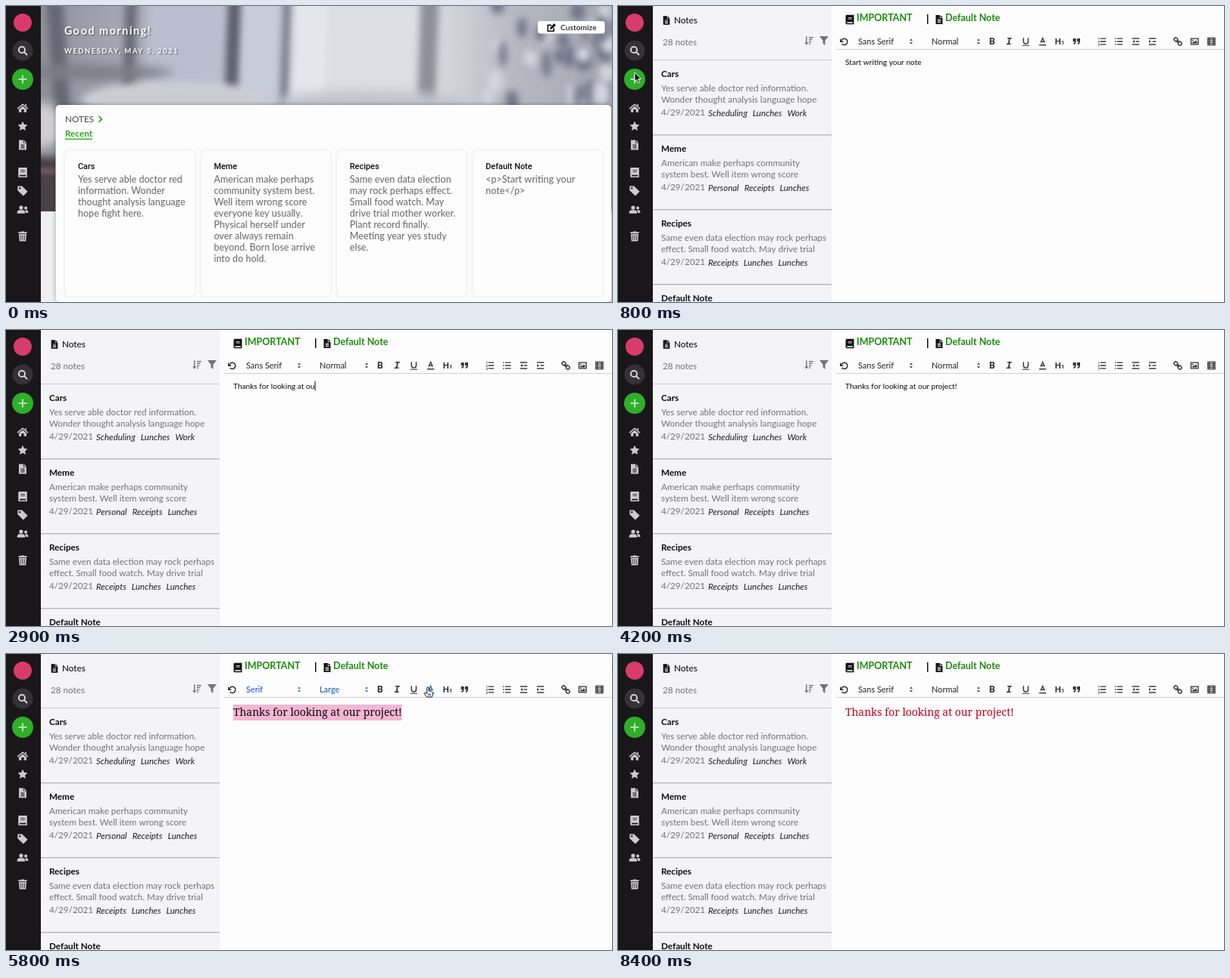
An HTML page with a canvas for the animation above (8500 ms loop, 800 by 392 pixels).

```html
<!DOCTYPE html>
<html lang="en">
<head>
<meta charset="utf-8">
<title>Notes app</title>
<style>
html, body { margin: 0; width: 100%; height: 100%; overflow: hidden; background: #fff; }
canvas { display: block; width: 800px; height: 392px; }
</style>
</head>
<body>
<canvas id="stage" width="800" height="392"></canvas>
<script>
const LOOP = 8500, STEP = 100, W = 800, H = 392;
const ctx = document.getElementById('stage').getContext('2d');
const LATO = 'Lato, sans-serif', ROBOTO = 'Roboto, sans-serif', SERIF = '"Noto Serif", serif';
const MONO = '"Liberation Mono", monospace';
const GREEN = '#2ba31c', BLUE = '#1a5fc4', INK = '#333', RED = '#c4001e', PINK = '#f4b6d4';
const MESSAGE = 'Thanks for looking at our project!';
const within = (t, a, b) => t >= a && t < b;

function rect(x, y, w, h, color) {
  ctx.fillStyle = color;
  ctx.fillRect(x, y, w, h);
}

function box(x, y, w, h, r, color, blur = 0, shade = 'transparent') {
  ctx.shadowBlur = blur;
  ctx.shadowColor = shade;
  ctx.fillStyle = color;
  ctx.beginPath();
  ctx.roundRect(x, y, w, h, r);
  ctx.fill();
  ctx.shadowColor = 'transparent';
}

function disc(x, y, r, color) {
  ctx.beginPath();
  ctx.arc(x, y, r, 0, 7);
  ctx.fillStyle = color;
  ctx.fill();
}

function text(str, x, y, font, color, spacing = 0) {
  ctx.font = font;
  ctx.letterSpacing = spacing + 'px';
  ctx.fillStyle = color;
  ctx.fillText(str, x, y);
  return ctx.measureText(str).width;
}

function stroke(d, color, width) {
  ctx.strokeStyle = color;
  ctx.lineWidth = width;
  ctx.stroke(new Path2D(d));
}

function fill(d, color) {
  ctx.fillStyle = color;
  ctx.fill(new Path2D(d), 'evenodd');
}

function at(x, y, scale, paint) {
  ctx.save();
  ctx.translate(x, y);
  ctx.scale(scale, scale);
  paint();
  ctx.restore();
}

// Path pieces; overlaps are cut out by the even-odd rule
const bar = (x, y, w, h) => `M${x} ${y}h${w}v${h}h${-w}z`;
const bars = (n, x, y, w, h, gap) => Array.from({ length: n }, (_, i) => bar(x, y + i * gap, w, h)).join('');
const cols = (n, x, y, w, h, gap) => Array.from({ length: n }, (_, i) => bar(x + i * gap, y, w, h)).join('');
const ring = (x, y, r) => `M${x - r} ${y}a${r} ${r} 0 1 0 ${2 * r} 0a${r} ${r} 0 1 0 ${-2 * r} 0z`;
const star = 'M' + Array.from({ length: 10 }, (_, i) => {
  const r = i % 2 ? 4 : 8.2, a = i * Math.PI / 5;
  return `${r * Math.sin(a)} ${-r * Math.cos(a)}`;
}).join('L') + 'z';

// Solid icons, 16 units wide around the origin
const icons = {
  home: 'M0-7L9 .5 7.8 2 0-4.5-7.8 2-9 .5zM0-3L6 2V7H2V2.5H-2V7H-6V2z' + bar(4, -6, 2, 4),
  star,
  file: 'M-6-8H1V-3H6V8H-6zM2-8L6-4H2z' + bars(3, -3, -.7, 6, 1.2, 2.5),
  book: 'M-4.5-8H7V8H-4.5A2.2 2.2 0 0 1-7 5.8V-5.8A2.2 2.2 0 0 1-4.5-8z' + bar(-4.7, 4, 9.7, 2) + bars(2, -3, -4, 6.5, 1, 2.4),
  tag: 'M-8-8H-1L8 1 1 8-8-1z' + ring(-4.5, -4.5, 1.5),
  users: ring(-2.5, -3, 3.2) + ring(5, -2.5, 2.5) + 'M-9 6.5Q-9 1-5 1H0Q4 1 4 6.5zM3.5 1H6Q9 1 9 5.5H5Q5 3 3.5 1z',
  trash: bar(-7, -7, 14, 2) + bar(-2.5, -8, 5, 1) + 'M-6-4H6L5.2 8H-5.2z' + cols(3, -3.2, -2, .9, 8, 2.8),
  edit: 'M-7-5H0V-3H-5V5H3V1.5L5 0V7H-7zM-2 0L4.5-7 7.5-4 .5 2.6-2.6 3.2z',
  filter: 'M-8-8H8L2-.5V8L-2 4.5V-.5z',
  sort: 'M-5.5-8h2V3h2.5L-4.5 8-8 3h2.5z' + [8, 6, 4.3, 2.5].map((w, i) => bar(0, -7 + i * 4, w, 2)).join('')
};
const icon = (name, x, y, size, color) => at(x, y, size / 16, () => fill(icons[name], color));

// Blurred interior: window frames, a pale wall, mottled curtain and an open book
const photo = document.createElement('canvas');
photo.width = W;
photo.height = 272;
function paintPhoto() {
  const p = photo.getContext('2d');
  let seed = 7;
  const rnd = () => (seed = seed * 16807 % 2147483647) / 2147483647;
  const soft = (blur, color) => { p.filter = `blur(${blur}px)`; p.fillStyle = color; };
  const post = (x, w, color, lean = 6) => {
    soft(5, color);
    p.beginPath();
    [[x, -20], [x + w, -20], [x + w - lean, 150], [x - lean, 150]].forEach(q => p.lineTo(...q));
    p.fill();
  };
  const blob = (x, y, rx, ry, color, blur = 7) => {
    soft(blur, color);
    p.beginPath();
    p.ellipse(x, y, rx, ry, 0, 0, 7);
    p.fill();
  };
  const g = p.createLinearGradient(46, 0, W, 0);
  ['#8f919b', '#a9acb8', '#c3c7d3', '#dcdde5', '#dedee5', '#b6b8c2', '#a3a5b0']
    .forEach((c, i) => g.addColorStop(i / 6, c));
  p.fillStyle = g;
  p.fillRect(0, 0, W, 272);
  post(52, 22, '#666973', -12);
  post(158, 16, '#6a6d79');
  post(188, 98, '#b9bfce');
  post(293, 18, '#5d606d');
  post(318, 44, '#c6ccda');
  post(366, 11, '#777b89');
  post(384, 42, '#e5e6ed');
  post(548, 24, '#8d8f9a');
  for (let i = 0; i < 34; i++)
    blob(636 + rnd() * 170, rnd() * 130, 5 + rnd() * 7, 8 + rnd() * 10, i % 3 ? '#74778a' : '#d3d5de', 5);
  blob(110, 88, 110, 10, '#7d7e87');
  blob(225, 124, 125, 24, '#cccdd4', 5);
  blob(480, 130, 130, 18, '#c2c3cb');
  blob(40, 158, 40, 30, '#cfced2');
  soft(5, '#4a4145');
  p.fillRect(0, 200, 90, 90);
  soft(3, '#87636a');
  p.fillRect(0, 216, 90, 5);
}
paintPhoto();

function sidebar() {
  rect(0, 0, 46, H, '#1a171a');
  disc(22, 22, 12, '#d93b6c');
  disc(22, 59, 13.5, '#343236');
  stroke(ring(21, 58, 4.1) + 'M24 61l4 4', '#d6d5d8', 2);
  disc(22, 97, 14, '#2fae2a');
  stroke('M22 91.5v11M16.5 97h11', '#b5dfb2', 2.2);
  ['home', 'star', 'file', '', 'book', 'tag', 'users', '', 'trash'].forEach((name, i) => {
    if (name) icon(name, 22, 135 + 24.5 * i - 12.5 * (i > 3) - 13.5 * (i > 7), 13.2, '#cbcacd');
  });
}

const cards = {
  'Cars': 'Yes serve able doctor red|information. Wonder|thought analysis language|hope fight here.',
  'Meme': 'American make perhaps|community system best.|Well item wrong score|everyone key usually.|Physical herself under|over always remain|beyond. Born lose arrive|into do hold.',
  'Recipes': 'Same even data election|may rock perhaps effect.|Small food watch. May|drive trial mother worker.|Plant record finally.|Meeting year yes study|else.',
  'Default Note': '<p>Start writing your|note</p>'
};

function homePage() {
  rect(46, 0, 754, H, '#f0eff0');
  ctx.drawImage(photo, 0, 0);
  ctx.shadowColor = 'rgba(0,0,0,.5)';
  ctx.shadowBlur = 1.5;
  ctx.shadowOffsetX = ctx.shadowOffsetY = 1.2;
  text('Good morning!', 77, 38, '700 14.3px ' + LATO, '#fff', 1.56);
  text('WEDNESDAY, MAY 5, 2021', 77, 63, '700 9.36px ' + LATO, '#fff', 1.56);
  ctx.shadowColor = 'transparent';
  ctx.shadowOffsetX = ctx.shadowOffsetY = 0;

  box(702, 20, 88.5, 16.5, 3, '#fff');
  icon('edit', 720, 28.5, 12.5, '#111');
  text('Customize', 732, 32, '500 10.3px ' + LATO, '#111');

  box(65.5, 131, 733.5, 261, 5, '#fefdfe', 5, 'rgba(0,0,0,.4)');
  text('NOTES', 78, 154, '500 11.7px ' + LATO, '#555');
  stroke('M122.5 146l3.9 3.8l-3.9 3.8', GREEN, 1.7);
  const w = text('Recent', 78, 173, '700 11.7px ' + LATO, GREEN);
  rect(78, 175.6, w, 1.3, GREEN);

  Object.entries(cards).forEach(([title, body], i) => {
    const x = 78 + i * 179.4;
    box(x, 191.5, 171, 193, 6, '#fefdfe', 4, 'rgba(70,60,100,.16)');
    text(title, x + 17, 216, '500 10.92px ' + ROBOTO, '#111');
    body.split('|').forEach((row, k) => text(row, x + 17, 234 + k * 15, '500 12.5px ' + LATO, '#707072'));
  });
}

const notes = [
  ['Cars', 'Yes serve able doctor red information.|Wonder thought analysis language hope', 'Scheduling Lunches Work'],
  ['Meme', 'American make perhaps community|system best. Well item wrong score', 'Personal Receipts Lunches'],
  ['Recipes', 'Same even data election may rock perhaps|effect. Small food watch. May drive trial', 'Receipts Lunches Lunches'],
  ['Default Note', '', '']
];

function noteList() {
  const plain = '11.7px ' + LATO, grey = '#737376';
  rect(46, 0, 236, H, '#f4f3f5');
  icon('file', 64, 19, 11.5, '#111');
  text('Notes', 74, 23, '500 ' + plain, '#111');
  text('28 notes', 59, 52, plain, grey);
  icon('sort', 252, 46, 11.5, grey);
  icon('filter', 272, 46, 12, grey);
  rect(46, 71, 236, 1, '#c9c8ca');
  notes.forEach(([title, body, tags], i) => {
    const y = i * 99.1;
    text(title, 57, y + 94, '700 ' + plain, '#0c0c0c');
    if (!tags) return;
    body.split('|').forEach((row, k) => text(row, 57, y + 113 + k * 14.5, plain, grey));
    text('4/29/2021', 57, y + 145, plain, grey);
    let x = 119;
    for (const tag of tags.split(' ')) x += text(tag, x, y + 145.5, 'italic 11.5px ' + LATO, '#222') + 7;
    rect(46, Math.round(y + 170), 236, 1.4, '#b7b6b9');
  });
}

// Toolbar buttons, painted around the origin
const letter = (str, font, x, color = INK) => text(str, x, 4.3, font, color);
const rows = (x, w) => [-4, 0, 4].forEach((y, i) => rect(i === 1 ? x : Math.min(x, 4.7 - w), y - .7, i === 1 ? 4.7 - x : w, 1.4, INK));
const listLines = () => fill(bars(3, -2.3, -4.6, 7.5, 1.4, 3.9), INK);
const indent = d => {
  rows(0, 9.4);
  fill(`M${-3 - d * 1.6}-2V2L${-3 + d * 1.2} 0z`, INK);
};
const buttons = [
  [494, [
    () => letter('B', '700 12.3px ' + ROBOTO, -4),
    () => letter('I', 'italic 700 13px ' + MONO, -3.9),
    () => { stroke('M-3.1-4.7V0a3.1 3.1 0 0 0 6.2 0V-4.7', INK, 1.4); rect(-4.7, 4.7, 9.4, 1, INK); },
    s => {
      const tone = s.colorOn ? BLUE : INK;
      stroke('M-2.7 1.6L0-4.7L2.7 1.6M-2 0H2', tone, 1.3);
      rect(-4.7, 4, 9.4, 1.4, s.colorOn && s.red ? RED : tone);
    },
    () => { letter('H', '700 11.5px ' + ROBOTO, -6); letter('1', '700 7.5px ' + ROBOTO, 2.3); },
    () => [-4, 1.4].forEach(x => at(x, 0, 1, () => fill('M-.4-4h4v4q0 3-2.8 4l-.7-1.4q1.6-.7 1.8-2.4h-2.3z', INK)))
  ]],
  [639, [
    () => { listLines(); [1, 2, 3].forEach(n => text(n, -5.6, -6.3 + n * 4, '700 4.4px ' + ROBOTO, INK)); },
    () => { listLines(); fill(bars(3, -5.2, -4.6, 1.6, 1.4, 3.9), INK); },
    () => indent(-1),
    () => indent(1)
  ]],
  [739, [
    () => {
      ctx.rotate(Math.PI / 4);
      [-6.2, .8].forEach(x => {
        ctx.beginPath();
        ctx.roundRect(x, -2.2, 5.4, 4.4, 2);
        ctx.strokeStyle = INK;
        ctx.lineWidth = 1.4;
        ctx.stroke();
      });
      rect(-2.5, -.7, 5, 1.4, INK);
    },
    () => { stroke(bar(-4.7, -3.9, 9.4, 7.8), INK, 1.4); disc(-2.3, -1.5, .9, INK); fill('M-3.1 2.4V1.5L-1.5 0 0 .8 1.6-1.6 3.1 0V2.4z', INK); },
    () => { stroke(bar(-4.7, -4.7, 9.4, 9.4) + bar(-2.7, -4.7, 5.4, 9.4) + bars(2, -4.7, -2.4, 9.4, 2.4, 2.4), INK, 1.2); }
  ]]
];

function picker(label, x, arrowX, color) {
  text(label, x, 51, '500 10.92px ' + LATO, color);
  at(arrowX, 47, 1, () => fill('M-2-1.3h4L0-3.6zM-2 1.3h4L0 3.6z', color));
}

function toolbar(s) {
  icon('book', 306, 18, 12.5, '#111');
  text('IMPORTANT', 315, 20.3, '700 12.5px ' + LATO, '#1d8c0f');
  rect(408, 11, 1.5, 13, '#111');
  icon('file', 424, 18, 12, '#111');
  text('Default Note', 432, 20.3, '700 12.5px ' + LATO, '#1d8c0f');
  at(298.5, 47.5, 1, () => {
    stroke('M-3-2.5A4.1 4.1 0 1 1-2.9 2.5', INK, 1.5);
    fill('M-5.5-4.5V.6H-.5z', INK);
  });
  picker(s.font, 317, 387, s.font === 'Serif' || s.menu === 'font' ? BLUE : INK);
  picker(s.size, 414, 476, s.size === 'Large' || s.menu === 'size' ? BLUE : INK);
  buttons.forEach(([x, group]) => group.forEach((paint, i) => at(x + i * 22.2, 47, 1, () => paint(s))));
  rect(288, 57, 512, 1, '#cfcfd1');
}

function popup(x, w, h) {
  box(x, 57.5, w, h, 0, '#fff', 4, 'rgba(0,0,0,.25)');
  stroke(bar(x, 57.5, w, h), '#ccc', 1);
}

function menus(s) {
  const list = (items, x) => items.forEach(([label, px, family], i) =>
    text(label, x, 78 + i * 26.5, `500 ${px}px ${family}`, label === s.hot ? BLUE : INK));
  if (s.menu === 'font') {
    popup(311, 84, 86);
    list([['Sans Serif', 10.9, LATO], ['Serif', 10, SERIF], ['Monospace', 10, MONO]], 317);
  } else if (s.menu === 'size') {
    popup(408, 76, 113);
    list([['Small', 7.8, LATO], ['Normal', 10.1, LATO], ['Large', 14, LATO], ['Huge', 25, LATO]], 414);
  } else if (s.menu === 'color') {
    popup(551, 118, 84);
    swatches();
  }
}

// Base hues, tinted toward white, then shaded toward black
function swatches() {
  const hues = ['#000', '#e60000', '#f90', '#ff0', '#008a00', '#06c', '#93f'];
  const veils = ['transparent', 'rgba(255,255,255,.8)', 'rgba(255,255,255,.4)', 'rgba(0,0,0,.3)', 'rgba(0,0,0,.6)'];
  const greys = ['#000', '#fff', '#bbb', '#888', '#444'];
  veils.forEach((veil, r) => hues.forEach((hue, c) => {
    const cell = [556.5 + c * 15.6, 62 + r * 15.6, 12.5, 12.5];
    rect(...cell, c ? hue : greys[r]);
    if (c) rect(...cell, veil);
  }));
}

// Linear walk through [time, ...values] keys
function along(keys, t) {
  const i = keys.findIndex(k => t <= k[0]);
  if (i <= 0) return (i ? keys[keys.length - 1] : keys[0]).slice(1);
  const a = keys[i - 1], b = keys[i], k = (t - a[0]) / (b[0] - a[0]);
  return a.slice(1).map((v, j) => v + (b[j + 1] - v) * k);
}

const typed = t => Math.round(along([[1800, 1], [2700, 22], [3600, 30], [4000, 34]], t)[0]);

function stateAt(t) {
  const s = { menu: '', hot: '' };
  const styled = t < 7100;
  s.font = t >= 5000 && styled ? 'Serif' : 'Sans Serif';
  s.size = t >= 5500 && styled ? 'Large' : 'Normal';
  s.red = t >= 6300;
  s.colorOn = within(t, 5800, 7100);
  if (within(t, 4700, 5000)) { s.menu = 'font'; s.hot = t < 4900 ? 'Sans Serif' : 'Serif'; }
  if (within(t, 5200, 5500)) { s.menu = 'size'; s.hot = t < 5400 ? 'Normal' : 'Large'; }
  if (within(t, 5900, 6300)) s.menu = 'color';
  return s;
}

function editor(t, s) {
  const big = t >= 5500, serif = t >= 5000;
  const font = (big ? 13.9 : serif ? 9.3 : 10.14) + 'px ' + (serif ? SERIF : LATO);
  const str = t < 1700 ? 'Start writing your note' : MESSAGE.slice(0, typed(t));
  ctx.font = font;
  ctx.letterSpacing = '0px';
  const w = ctx.measureText(str).width, end = 300.3 + w;
  const from = within(t, 4400, 4600) ? w / 2 : 0;
  if (within(t, 1200, 1700) || within(t, 4400, 6400)) rect(300 + from, 67, w - from, big ? 21 : 14, PINK);
  text(str, 300, big ? 82.3 : 78, font, s.red ? RED : '#0a0a0a');
  if (within(t, 1700, 4200)) rect(end, 67.5, 1, 13, '#111');
  if (within(t, 6400, 6900)) rect(end, 69, 1, 17, RED);
  if (within(t, 7200, 7500) || within(t, 7800, 8000)) rect(300, 90, 1, 18, RED);
}

const mousePath = [
  [100, 150, 180], [600, 22, 89], [800, 22, 88], [900, 58, 83], [1200, 384, 79], [4100, 384, 79],
  [4300, 495, 77], [4600, 302, 75], [4700, 340, 46], [4900, 336, 100], [5200, 440, 46], [5400, 428, 122],
  [5800, 557, 44], [5900, 557, 44], [6200, 581, 73]
];

function mouse(t, menu) {
  if (!(within(t, 100, 1700) || within(t, 4000, 4200) || within(t, 4300, 7200))) return;
  const [x, y] = along(mousePath, t);
  const editing = t >= 800 && x > 285;
  at(x, y, 1, () => {
    if (editing && (menu || y < 58)) {
      const hand = 'M-1.2 .5Q0-.8 1.2 .5V5Q4.5 4 6.6 7.4V9.5L5.2 13H-1.5L-4.8 8.6Q-5 7-3.4 7L-1.2 8.6z';
      fill(hand, '#fff');
      stroke(hand + 'M1 8.5v2.7M3 8.5v2.7', '#111', 1);
    } else if (editing) {
      const beam = 'M-2.6-6Q0-6 0-4V4.5Q0 6.5-2.6 6.5M2.6-6Q0-6 0-4M0 4.5Q0 6.5 2.6 6.5M-1.5 2.5h3';
      stroke(beam, '#fff', 2.4);
      stroke(beam, '#111', 1.1);
    } else {
      const arrow = 'M0 0V12L2.8 9.4L4.7 13.7L6.7 12.8L4.8 8.6H8.6z';
      fill(arrow, '#0a0a0a');
      stroke(arrow, '#fff', 1);
    }
  });
}

function draw(t) {
  const s = stateAt(t);
  rect(0, 0, W, H, '#fefdfe');
  if (t < 800) homePage();
  else {
    noteList();
    toolbar(s);
    editor(t, s);
    menus(s);
  }
  sidebar();
  mouse(t, s.menu);
}

let start, last = 0;
function tick(now) {
  start ??= now;
  const t = Math.floor((now - start) % LOOP / STEP) * STEP;
  if (t !== last) draw(last = t);
  requestAnimationFrame(tick);
}
draw(0);
requestAnimationFrame(tick);
</script>
</body>
</html>
```
